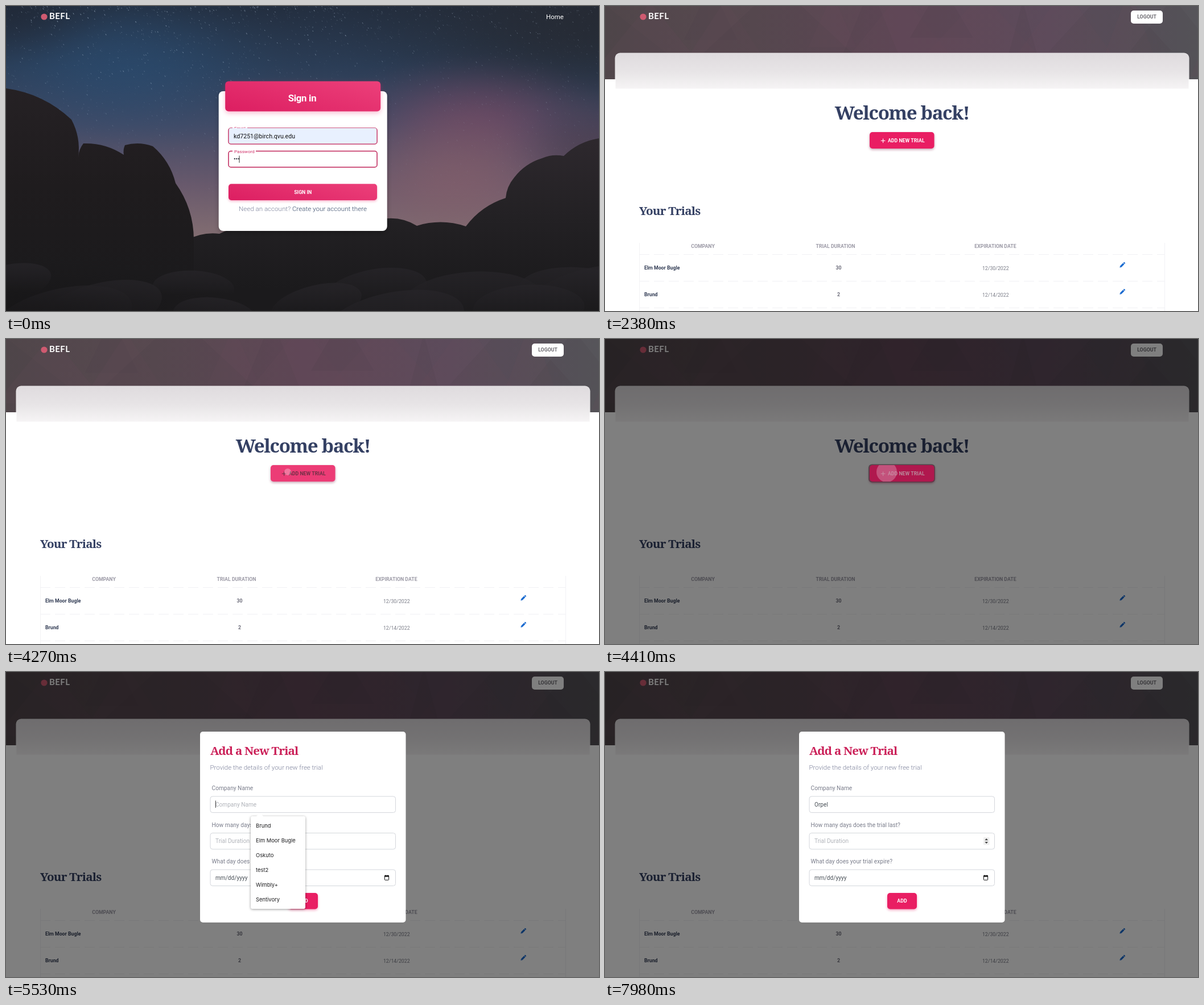
An HTML page with a canvas for the animation above (8 s loop, 1042 px wide and 537 px high).

```html
<!DOCTYPE html>
<html lang="en">
<head>
<meta charset="utf-8">
<title>Trial tracker</title>
<style>
html, body { margin: 0; width: 100%; height: 100%; overflow: hidden; background: #fff; }
canvas { display: block; width: 1042px; height: 537px; }
</style>
</head>
<body>
<canvas id="stage" width="1042" height="537"></canvas>
<script>
const W = 1042, H = 537, LOOP = 8000, STEP = 70;
const SANS = 'Roboto, sans-serif', SLAB = '"Noto Serif", serif';
const PINK = '#e91e63', NAVY = '#344063', BLUE = '#1769cf', EDGE = '#bf2459';
const stage = document.getElementById('stage').getContext('2d');
let c = stage;

const clamp = v => Math.max(0, Math.min(1, v));
const progress = (t, from, to) => clamp((t - from) / (to - from));
const between = (t, from, to) => t >= from && t < to;
const countPast = (t, times) => times.filter(x => t >= x).length;

function seeded(seed) {
  return () => (seed = (seed * 16807) % 2147483647) / 2147483647;
}

function text(str, x, y, size, color, o = {}) {
  c.font = `${o.weight || 400} ${size}px ${o.family || SANS}`;
  c.letterSpacing = (o.spacing || 0) + 'px';
  c.textAlign = o.align || 'left';
  c.fillStyle = color;
  c.fillText(str, x, y);
}
const caps = (str, x, y, color, align = 'center') =>
  text(str, x, y, 8.75, color, { weight: 700, align });
const slab = (str, x, y, size, color, align) =>
  text(str, x, y, size, color, { weight: 700, family: SLAB, spacing: -size * 0.04, align });

function rect(x, y, w, h, fill) {
  c.fillStyle = fill;
  c.fillRect(x, y, w, h);
}
function box(x, y, w, h, r, fill, shadow) {
  c.save();
  if (shadow) [c.shadowOffsetY, c.shadowBlur, c.shadowColor] = shadow;
  c.beginPath();
  c.roundRect(x, y, w, h, r);
  c.fillStyle = fill;
  c.fill();
  c.restore();
}
function outline(x, y, w, h, r, color, width) {
  c.beginPath();
  c.roundRect(x, y, w, h, r);
  c.strokeStyle = color;
  c.lineWidth = width;
  c.stroke();
}
function line(x0, y0, x1, y1, color, width) {
  c.beginPath();
  c.moveTo(x0, y0);
  c.lineTo(x1, y1);
  c.strokeStyle = color;
  c.lineWidth = width;
  c.stroke();
}
// Isosceles triangle with its tip at (x, y); a negative height points down
function triangle(x, y, half, height, fill) {
  c.beginPath();
  c.moveTo(x, y);
  c.lineTo(x + half, y + height);
  c.lineTo(x - half, y + height);
  c.fillStyle = fill;
  c.fill();
}
function disc(x, y, r, fill) {
  c.beginPath();
  c.arc(x, y, r, 0, 7);
  c.fillStyle = fill;
  c.fill();
}
function linear(x0, y0, x1, y1, ...colors) {
  const g = c.createLinearGradient(x0, y0, x1, y1);
  colors.forEach((color, i) => g.addColorStop(i / (colors.length - 1), color));
  return g;
}
// CSS-like 195deg gradient across a box
function pinkGradient(x, y, w, h) {
  const a = 195 * Math.PI / 180, s = Math.sin(a), k = Math.cos(a);
  const half = (Math.abs(w * s) + Math.abs(h * k)) / 2;
  const cx = x + w / 2, cy = y + h / 2;
  return linear(cx - s * half, cy + k * half, cx + s * half, cy - k * half, '#ec407a', '#dc1e61');
}
function glow(x, y, rx, ry, rgb, alpha) {
  c.save();
  c.translate(x, y);
  c.scale(rx, ry);
  const g = c.createRadialGradient(0, 0, 0, 0, 0, 1);
  for (let i = 0; i <= 8; i++) {
    const fall = (1 + Math.cos(Math.PI * i / 8)) / 2;
    g.addColorStop(i / 8, `rgba(${rgb},${alpha * fall})`);
  }
  rect(-1, -1, 2, 2, g);
  c.restore();
}
const caret = (x, y, h) => rect(x, y, 1, h, '#333');

function cached(draw) {
  const canvas = document.createElement('canvas');
  canvas.width = W;
  canvas.height = H;
  c = canvas.getContext('2d');
  draw();
  c = stage;
  return canvas;
}

function logo() {
  disc(67, 19, 5.6, '#cf5a70');
  text('BEFL', 76, 23.3, 15, '#fff', { weight: 700, family: 'Lato, sans-serif', spacing: 0.4 });
}

// Rock silhouette: each stretch between two points bulges outwards
function ridge(points, fill) {
  c.beginPath();
  c.moveTo(points[0][0], H);
  c.lineTo(...points[0]);
  for (let i = 1; i < points.length; i++) {
    const [px, py] = points[i - 1], [x, y] = points[i];
    c.quadraticCurveTo((px + x) / 2 + (y - py) * 0.16, (py + y) / 2 - (x - px) * 0.16, x, y);
  }
  c.lineTo(points[points.length - 1][0], H);
  c.fillStyle = fill;
  c.fill();
}

function drawStars() {
  const rnd = seeded(4127);
  for (let i = 0; i < 2600; i++) {
    const x = rnd() * W, y = rnd() ** 1.5 * 340, len = 0.8 + rnd() * 1.7;
    const fade = (1 - y / 380) * (x > 600 ? 0.65 : 1);
    line(x, y, x + len * 0.5, y + len, `rgba(178,196,216,${(0.12 + rnd() ** 3 * 0.7) * fade})`, 0.9);
  }
}

function drawBoulders() {
  const rnd = seeded(77);
  for (let i = 0; i < 12; i++) {
    const x = rnd() * W, y = 490 + i * 6, rx = 70 + rnd() * 80, ry = rx * 0.42;
    c.beginPath();
    c.ellipse(x, y, rx, ry, rnd() * 0.4 - 0.3, 0, 7);
    c.fillStyle = linear(0, y - ry, 0, y + ry * 0.4, 'rgba(38,36,40,.8)', '#1b1a1c');
    c.fill();
  }
}

function drawNight() {
  rect(0, 0, W, H, linear(0, 0, 0, 420, '#232e3f', '#2b3d56', '#434b66', '#68596c', '#867072'));
  glow(210, 110, 330, 170, '42,78,116', 0.6);
  glow(1042, 30, 520, 210, '38,42,51', 0.9);
  glow(830, 200, 270, 130, '118,72,98', 0.65);
  glow(790, 300, 260, 150, '138,96,106', 0.6);
  glow(1042, 250, 180, 120, '76,58,72', 0.6);
  glow(0, 0, 220, 120, '32,40,54', 0.7);
  drawStars();
  ridge([[318, 412], [375, 401], [430, 392], [670, 374], [722, 387], [808, 388], [878, 338],
    [893, 302], [942, 268], [980, 264], [W, 233]], linear(0, 240, 0, 500, '#2d282d', '#232124', '#1b1a1c'));
  ridge([[0, 145], [115, 200], [127, 266], [136, 242], [207, 262], [209, 245], [258, 247],
    [298, 312], [330, 412]], linear(0, 150, 0, 480, '#252124', '#1f1c1e', '#1b1a1c'));
  drawBoulders();
  glow(0, 560, 500, 120, '20,19,20', 0.6);
}

function drawSignIn() {
  drawNight();
  logo();
  text('Home', 949, 23, 11.5, '#fff');
  box(373.7, 150, 296, 246, 8, '#fff', [3, 8, 'rgba(0,0,0,.25)']);
  box(385.2, 132.4, 273, 53, 6, pinkGradient(385, 132, 273, 53), [3, 9, 'rgba(233,30,99,.3)']);
  text('Sign in', 520.5, 167.5, 16.8, '#fff', { weight: 700, align: 'center', spacing: -0.3 });

  outline(391, 215, 261, 28, 4, EDGE, 1.5);
  rect(398, 211, 26, 5, '#fff');
  text('Email', 401, 217.5, 8.1, '#d0326a');
  box(391.8, 215, 259.4, 27.3, 3, '#e8f0fe');
  text('kd7251@birch.qvu.edu', 400, 232.5, 10.6, '#111');

  outline(391, 255.5, 261, 28.2, 4, EDGE, 1.5);
  rect(398, 253, 41, 5, '#fff');
  text('Password', 401, 258.5, 8.1, '#d0326a');

  text('Need an account?', 409, 361.3, 11.6, '#7b809a', { weight: 300 });
  text('Create your account there', 503, 361.3, 11.6, '#344767', { weight: 300 });
}

function pencil(x, y) {
  c.save();
  c.translate(x, y);
  c.rotate(Math.PI / 4);
  rect(-1.6, -3.4, 3.2, 7.4, BLUE);
  triangle(0, 6.4, 1.6, -2.4, BLUE);
  box(-1.6, -6.1, 3.2, 2, [1, 1, 0, 0], BLUE);
  c.restore();
}

// Header backdrop: broad gradient under faint random facets
function drawFacets() {
  rect(0, 0, W, 129, linear(0, 0, W, 0, '#50464a', '#584950', '#5f4756', '#5c4b5b', '#56555a'));
  const rnd = seeded(905);
  c.save();
  c.beginPath();
  c.rect(0, 0, W, 129);
  c.clip();
  for (let i = 0; i < 16; i++) {
    const tone = i % 2 ? '110,76,94' : '66,62,68';
    triangle(i * 70 + rnd() * 60, -40 * rnd(), 40 + rnd() * 100, 90 + rnd() * 80, `rgba(${tone},.12)`);
  }
  c.restore();
}

function drawDashboard() {
  rect(0, 0, W, H, '#fff');
  drawFacets();
  box(17.5, 82.5, 1009, 50, [9, 9, 0, 0], 'rgba(255,255,255,.85)');
  box(18.5, 83.5, 1007, 62, [8, 8, 0, 0], linear(0, 83, 0, 146, '#dfdbde', '#e7e4e6', '#f6f4f5'));

  logo();
  box(924, 8, 56, 23, 5, '#fff');
  caps('LOGOUT', 952, 22.3, '#6c6a70');
  slab('Welcome back!', 522, 199.5, 33, NAVY, 'center');
  slab('Your Trials', 60, 367.5, 20.6, NAVY);

  for (const x of [60, 983]) rect(x, 417, 1, 120, '#f2f2f5');
  c.setLineDash([18, 8]);
  for (let i = 0; i < 3; i++) line(60, 437.5 + i * 47, 983, 437.5 + i * 47, '#f1f1f4', 1);
  c.setLineDash([]);

  caps('COMPANY', 172, 426, '#9c9aa6');
  caps('TRIAL DURATION', 405, 426, '#9c9aa6');
  caps('EXPIRATION DATE', 686, 426, '#9c9aa6');
  [['Elm Moor Bugle', '30', '12/30/2022'], ['Brund', '2', '12/14/2022']].forEach(([name, days, date], i) => {
    const y = 464 + i * 47.2;
    caps(name, 69, y, '#333d55', 'left');
    caps(days, 410.5, y, '#6d6d7b');
    text(date, 686.3, y + 1, 8.8, '#7b7d88', { align: 'center' });
    pencil(909, y - 8);
  });
}

function addButton(fill, ink) {
  box(465, 222, 113.5, 29, 5, fill, [2, 4, 'rgba(120,20,60,.4)']);
  line(484.8, 237.2, 492.4, 237.2, ink, 1.1);
  line(488.6, 233.4, 488.6, 241, ink, 1.1);
  caps('ADD NEW TRIAL', 529.3, 240, ink);
}

function field(y, label, value, color) {
  text(label, 361.5, y - 11, 10.2, '#7a7d8b');
  outline(359, y, 325.5, 28.5, 4, '#d4d7dc', 1);
  text(value, 368, y + 17.9, 10.1, color);
}

function spinner() {
  box(665, 291, 10.5, 13.5, 1, '#efefef');
  for (const side of [-1, 1]) triangle(670.2, 297.6 + side * 4.6, 2.8, -side * 3.2, '#444');
}

function calendarIcon() {
  outline(665.4, 358.7, 7.2, 7.6, 0.8, '#111', 1);
  rect(665, 358.2, 8, 2.4, '#111');
  for (const x of [666.5, 670.5]) rect(x, 357.2, 1, 1.5, '#111');
}

function suggestions(items) {
  box(430, 254, 96, items.length * 26.1 + 6.4, 3, '#fff', [1, 4, 'rgba(0,0,0,.4)']);
  triangle(446, 248, 6.5, 6.5, '#fff');
  items.forEach((item, i) =>
    text(item, 439, 273.6 + i * 26.1, 9.4, '#1c1c1e', { family: 'Inter, sans-serif' }));
}

const COMPANIES = ['Brund', 'Elm Moor Bugle', 'Oskuto', 'test2', 'Wimbly+', 'Sentivory'];
const TYPED = 'Orpel';

function drawModal(t) {
  const typed = TYPED.slice(0, countPast(t, [5950, 6090, 6160, 6790, 6930]));
  c.save();
  c.globalAlpha = progress(t, 4410, 4560);
  c.translate(0, -36 * (1 - progress(t, 4410, 4690)) ** 2);
  box(341, 105, 361.5, 336, 5, '#fff');
  slab('Add a New Trial', 359, 146, 20.6, '#cb2159');
  text('Provide the details of your new free trial', 358.5, 171.6, 11.5, '#7b809a', { weight: 300 });
  field(219, 'Company Name', typed || 'Company Name', typed ? '#495057' : '#b1b4ba');
  field(283.5, 'How many days does the trial last?', 'Trial Duration', '#b1b4ba');
  field(348, 'What day does your trial expire?', 'mm/dd/yyyy', '#495057');
  calendarIcon();
  box(496, 389, 52, 28.5, 5, PINK, [2, 4, 'rgba(233,30,99,.4)']);
  caps('ADD', 522, 406.2, '#fff');
  if (t >= 7140) spinner();
  if (between(t, 5250, 7280) && !between(t, 6650, 6790)) {
    c.font = '10.1px ' + SANS;
    c.letterSpacing = '0px';
    caret(367.8 + c.measureText(typed).width, 226.5, 12.5);
  }
  if (between(t, 7420, 7980)) caret(368, 292, 12);
  if (between(t, 5460, 6090)) suggestions(COMPANIES.filter(name => name.startsWith(typed)));
  c.restore();
}

const signInPage = cached(drawSignIn);
const dashboardPage = cached(drawDashboard);

function signInScene(t) {
  c.drawImage(signInPage, 0, 0);
  const hover = progress(t, 1470, 1610);
  box(391, 313.3, 261, 28.7, 5, pinkGradient(391, 313, 261, 29),
    [2 + 3 * hover, 4 + 7 * hover, 'rgba(233,30,99,.32)']);
  caps('SIGN IN', 521.7, 330.8, '#fff');
  const dots = 3 + countPast(t, [140, 350, 490, 560, 840]);
  for (let i = 0; i < dots; i++) disc(401.8 + i * 3.5, 269, 1.2, '#3c3f48');
  if (t < 1330) caret(399 + dots * 3.5, 263.5, 12.5);
}

function dashboardScene(t) {
  c.drawImage(dashboardPage, 0, 0);
  const hover = progress(t, 3220, 3570);
  const mix = (a, b) => Math.round(a + (b - a) * hover);
  addButton(`rgb(${mix(233, 236)},${mix(30, 60)},${mix(99, 118)})`,
    `rgb(${mix(255, 112)},${mix(255, 48)},${mix(255, 70)})`);
  if (t < 4270) return;

  const ripple = 6 + 12 * progress(t, 4270, 4410);
  if (t < 4410) {
    disc(495, 234, ripple, 'rgba(255,255,255,.3)');
    return;
  }
  rect(0, 0, W, H, 'rgba(0,0,0,.5)');
  c.save();
  c.globalAlpha = 1 - progress(t, 4410, 4620);
  box(463, 220.5, 117, 32, 6, '#54484d');
  addButton('#b0184e', '#b98a9b');
  c.beginPath();
  c.roundRect(465, 222, 113.5, 29, 5);
  c.clip();
  disc(495, 234, ripple, 'rgba(216,140,170,.5)');
  c.restore();
  drawModal(t);
}

let start;
function frame(now) {
  start ??= now;
  const t = Math.floor(((now - start) % LOOP) / STEP) * STEP;
  if (t < 2380) signInScene(t);
  else dashboardScene(t);
  requestAnimationFrame(frame);
}
requestAnimationFrame(frame);
</script>
</body>
</html>
```
